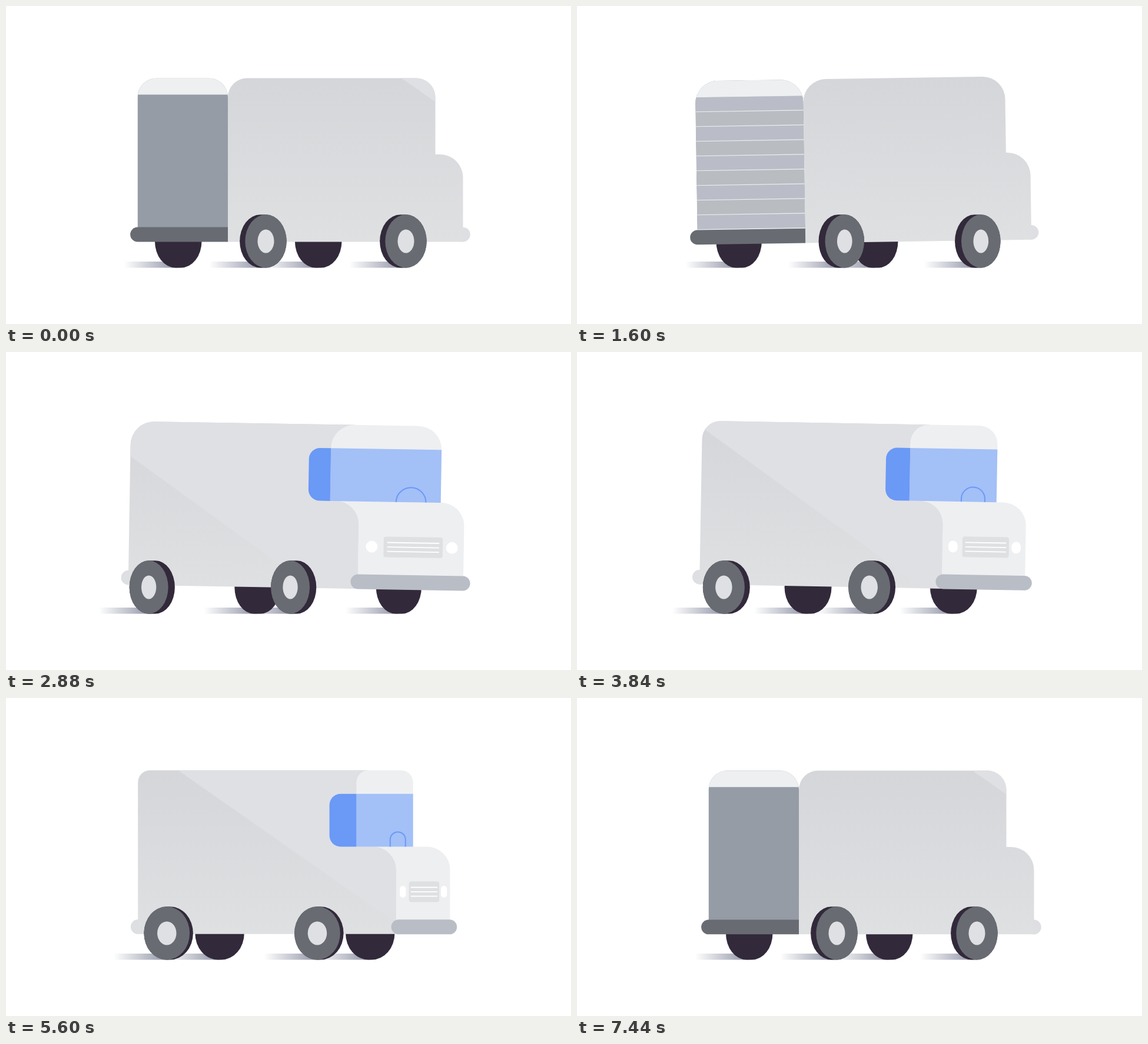
Recreate the animation shown at these times as an HTML page with a canvas. Size 960 by 540 pixels, loop 7520 ms.

```html
<!DOCTYPE html>
<html lang="en">
<head>
<meta charset="utf-8">
<title>Van</title>
<style>
  html, body { margin: 0; width: 100%; height: 100%; overflow: hidden; background: #fff; }
  canvas { display: block; width: 960px; height: 540px; }
</style>
</head>
<body>
<canvas id="stage" width="960" height="540"></canvas>
<script>
const g = document.getElementById('stage').getContext('2d');
const LOOP = 7520, STEP = 80;
const TOP = 122.3, BASE = 400.3, SILL = 375.5, BELT = 252, GROUND = 444.5;
const PIVOT = 520;

const sine = t => (1 - Math.cos(Math.PI * t)) / 2;
const cubic = t => t < 0.5 ? 4 * t ** 3 : 1 - 4 * (1 - t) ** 3;

// Tracks: [time, value, easing towards this key]
const tracks = {
  // signed width of the visible end: negative = rear, positive = front
  face: [[0, -153.5], [960, -153.5], [1800, -188], [2760, 189], [3960, 147],
         [5090, 147], [6585, -173, cubic], [7440, -153.5], [LOOP, -153.5]],
  x: [[0, 506], [960, 506], [1800, 492], [2880, 492], [3960, 484], [4880, 484],
      [7440, 506], [LOOP, 506]],
  tilt: [[0, 0], [960, 0], [1600, -0.88], [1840, -0.95], [2700, 0.95], [3840, 1.02],
         [4300, 0], [LOOP, 0]],
  bob: [[0, 0.1], [160, 0], [400, 0.8], [660, -1.3], [960, 0], [1600, 0.2], [2880, 0.4],
        [3840, -0.2], [4300, 0], [4480, 0.6], [4800, 0], [4880, 0], [5600, 0.5],
        [6240, 1.5], [6900, -1.6], [7400, 1.1], [7440, 1], [LOOP, 0.1]],
  shut: [[0, 0], [200, 0], [920, 1], [4400, 1], [4480, 0], [LOOP, 0]]
};

function at(keys, t) {
  const i = keys.findIndex(k => k[0] > t);
  if (i < 0) return keys[keys.length - 1][1];
  const [t0, a] = keys[i - 1], [t1, b, ease = sine] = keys[i];
  return a + (b - a) * ease((t - t0) / (t1 - t0));
}

// Part positions relative to the van centre, by visible end width
const poses = [-183.5, -153.5, 0, 97, 147, 187.5];
const parts = {
  back: [-105.6, -129, -244, -264, -276, -284.3],
  nose: [237.4, 223.5, 158, 107, 78.4, 56.5],
  hood: [41, 47, 82, 67, 57.6, 49],
  rearWheel: [-39, -64.5, -185, -215, -234.5, -249.2],
  frontWheel: [192.5, 173.5, 92, 40.5, 13, -8.7],
  shine: [650, 563, 385, 200, 106, 29]
};

function pose(name, w) {
  const v = parts[name];
  let i = 0;
  while (i < poses.length - 2 && w > poses[i + 1]) i++;
  return v[i] + (v[i + 1] - v[i]) * (w - poses[i]) / (poses[i + 1] - poses[i]);
}

function box(x, y, w, h, color, r = 0) {
  if (w <= 0) return;
  g.fillStyle = color;
  g.beginPath();
  g.roundRect(x, y, w, h, r);
  g.fill();
}

function oval(x, y, rx, ry, color) {
  g.fillStyle = color;
  g.beginPath();
  g.ellipse(x, y, rx, ry, 0, 0, 7);
  g.fill();
}

function clipped(path, draw) {
  g.save();
  g.clip(path);
  draw();
  g.restore();
}

const HUB_Y = 399.4, WHEEL_R = 45.1;

function tyre(x, rx, depth) {
  const d = Math.abs(depth) / 2;
  g.fillStyle = '#32293a';
  g.beginPath();
  g.ellipse(x - d, HUB_Y, rx, WHEEL_R, 0, Math.PI / 2, Math.PI * 1.5);
  g.ellipse(x + d, HUB_Y, rx, WHEEL_R, 0, -Math.PI / 2, Math.PI / 2);
  g.fill();
}

function shadow(x, half) {
  const x0 = x - half - 52;
  const fade = g.createLinearGradient(x0, 0, x, 0);
  fade.addColorStop(0, 'rgba(141,145,164,0)');
  fade.addColorStop(1, 'rgba(141,145,164,1)');
  box(x0, 434, x - x0, GROUND - 434, fade);
}

function sidePath(a, b, hoodX, r, front) {
  const p = new Path2D();
  p.moveTo(a, BASE);
  p.lineTo(a, TOP + r);
  p.arcTo(a, TOP, a + r, TOP, r);
  if (front) {
    p.lineTo(b + r, TOP);
    p.lineTo(b + r, TOP + r);
    p.lineTo(b, TOP + r);
  } else {
    p.lineTo(b - r, TOP);
    p.arcTo(b, TOP, b, TOP + r, r);
  }
  p.lineTo(b, BELT);
  p.lineTo(hoodX - 39, BELT);
  p.arcTo(hoodX, BELT, hoodX, BELT + 39, 39);
  p.lineTo(hoodX, BASE);
  p.closePath();
  return p;
}

function drawSide(path, shineX) {
  const shade = g.createLinearGradient(0, TOP, 0, BASE);
  shade.addColorStop(0, '#d4d6d9');
  shade.addColorStop(1, '#dfe0e2');
  g.fillStyle = shade;
  g.fill(path);
  clipped(path, () => {
    g.fillStyle = '#dfe0e4';
    g.beginPath();
    g.moveTo(shineX, BASE);
    g.lineTo(shineX - (BASE - 100) / 0.7, 100);
    g.lineTo(1500, 100);
    g.lineTo(1500, BASE);
    g.fill();
  });
}

function drawRear(a, w, r, shut) {
  const x = a - w, capY = 150.3;
  const face = new Path2D();
  face.roundRect(x, TOP, w, BASE - TOP - 12, [r, r, 0, 0]);
  clipped(face, () => {
    box(x, TOP, w, BASE - TOP, '#959ca6');
    const drop = (SILL - capY) * (shut - 1);
    if (shut > 0) {
      for (let i = 0; i < 9; i++) {
        const y = capY + drop + i * 25;
        box(x, y, w, 25.2, i % 2 ? '#b9bdc2' : '#babdc7');
        box(x, y + 23.8, w, 1.8, '#eeeff1');
      }
    }
    box(x, TOP, w, capY - TOP, '#eeeff1');
  });
  box(x - 12.4, SILL, w + 12.4, BASE - SILL, '#686c72', [12.4, 0, 0, 12.4]);
}

function drawHoodFace(hoodX, fw) {
  box(hoodX - 40, BELT, fw + 40, BASE - BELT - 8, '#eeeff1', [0, Math.min(39, fw + 39), 0, 0]);
}

function drawFront(b, hoodX, w, fw, r) {
  const winY = 162.3, winH = BELT - winY;
  box(b, TOP, w, BELT - TOP, '#eeeff1', [r, r, 0, 0]);
  box(b, winY, w, winH, '#a3c0f7');
  const sideWin = Math.min(55 - 0.095 * w, w * 0.8);
  const wr = Math.min(19, sideWin);
  box(b - sideWin, winY, sideWin, winH, '#6a99f6', [wr, 0, 0, wr]);

  const wheelR = 0.135 * w, wheelX = b + 0.731 * w;
  const glass = new Path2D();
  glass.rect(b, winY, w, winH);
  clipped(glass, () => {
    g.strokeStyle = '#6a99f6';
    g.lineWidth = 2;
    g.beginPath();
    g.roundRect(wheelX - wheelR, 227, wheelR * 2, 70, wheelR);
    g.stroke();
  });

  const lamp = 0.0555 * fw;
  for (const f of [0.128, 0.888])
    box(hoodX + f * fw - lamp, 318.5, lamp * 2, 20, '#fff', lamp);
  const gx = hoodX + 0.241 * fw, gw = 0.56 * fw, pad = 0.034 * fw;
  box(gx, 311, gw, 35, '#dfe0e2', 4);
  for (let i = 0; i < 3; i++)
    box(gx + pad, 320.1 + i * 7.6, gw - pad * 2, 1.8, '#fff');

  const over = Math.min(12, 4 + 0.042 * w);
  box(hoodX - over, SILL + 0.3, fw + over + 11.8, 25, '#b9bdc6', 12.5);
}

function draw(t) {
  const w = at(tracks.face, t), cx = at(tracks.x, t);
  const size = Math.abs(w), front = w > 0, r = 0.212 * size;
  const a = cx + pose('back', w), b = cx + pose('nose', w);
  const hoodX = b + pose('hood', w), fw = 0.955 * size;
  const rx = 45 - 0.064 * size, depth = 0.06 * w, half = rx + Math.abs(depth) / 2;
  const far = Math.sign(w) * Math.max(0, size - 9.3);
  const wheels = [cx + pose('rearWheel', w), cx + pose('frontWheel', w)];

  g.fillStyle = '#fff';
  g.fillRect(0, 0, 960, 540);

  for (const x of wheels) {
    shadow(x + depth / 2, half);
    shadow(x + depth / 2 + far, half);
  }
  for (const x of wheels) tyre(x + depth / 2 + far, rx, depth);

  g.save();
  g.translate(PIVOT, 400 + at(tracks.bob, t));
  g.rotate(at(tracks.tilt, t) * Math.PI / 180);
  g.translate(-PIVOT, -400);
  const nubX = front ? a : hoodX;
  oval(nubX, 388, 12.3, 12.4, '#dedfe2');
  if (front) drawHoodFace(hoodX, fw);
  drawSide(sidePath(a, b, hoodX, r, front), cx + pose('shine', w));
  if (front) drawFront(b, hoodX, w, fw, r);
  else drawRear(a, size, r, at(tracks.shut, t));
  g.restore();

  const hub = 20 - 0.039 * size;
  for (const x of wheels) {
    tyre(x + depth / 2, rx, depth);
    oval(x, HUB_Y, rx, WHEEL_R, '#686c72');
    oval(x, HUB_Y, hub, 20, '#dfe0e4');
  }
}

function tick() {
  const t = performance.now() % LOOP;
  draw(Math.floor(t / STEP) * STEP);
  requestAnimationFrame(tick);
}
tick();
</script>
</body>
</html>
```
